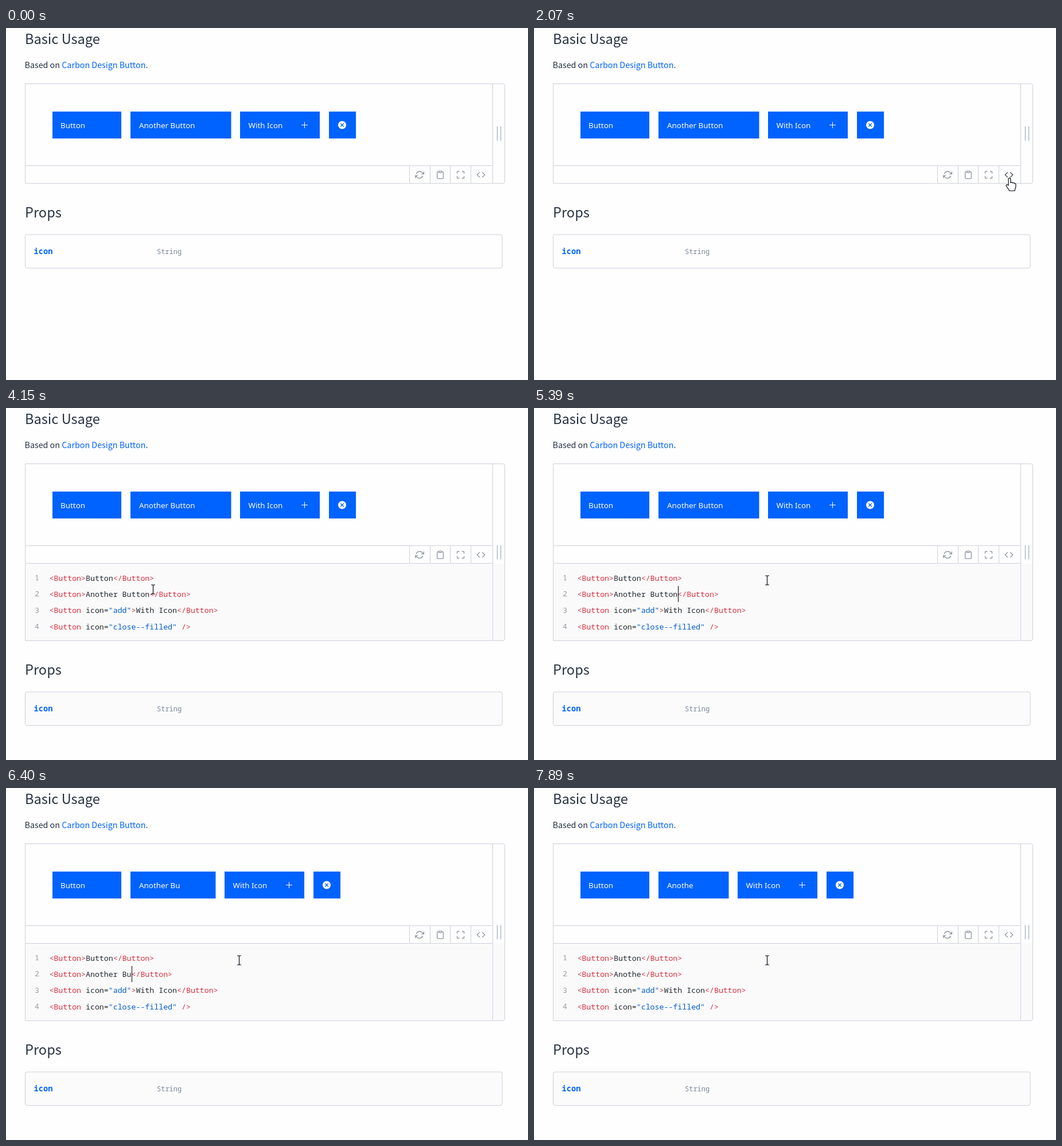
Animation of 910 by 615 pixels, one loop 8000 ms. Source, as an HTML page:

```html
<!DOCTYPE html>
<html lang="en">
<head>
<meta charset="utf-8">
<title>Button docs</title>
<style>
  html, body { margin: 0; width: 100%; height: 100%; overflow: hidden; background: #fefefe; }
  svg { display: block; }
  text { fill: #273142; font: 14.3px "Noto Sans CJK JP", "Noto Sans CJK SC", "Noto Sans", sans-serif; }
  .title { font-size: 23.6px; }
  .link { fill: #0062ff; }
  .label { fill: #fff; font: 13.4px "Noto Sans", sans-serif; }
  .button { fill: #0062ff; }
  .line { fill: none; stroke: #cfd1dd; }
  .icon { fill: none; stroke: #9096a1; stroke-width: 2; stroke-linecap: round; stroke-linejoin: round; }
  .icon.hover { stroke: #454b57; }
  .handle { stroke: #b3bccb; stroke-width: 1.6; }
  .mono { font: 13.25px "Noto Sans Mono", monospace; fill: #24292e; }
  .tag { fill: #d9303e; }
  .string { fill: #005cc5; }
  .number { fill: #989da6; }
  .cursor { fill: #fff; stroke: #0b0b18; stroke-width: 1.2; stroke-linejoin: round; }
</style>
</head>
<body>
<svg width="910" height="615" viewBox="0 0 910 615">
  <text class="title" x="33" y="27.5">Basic Usage</text>
  <text x="32.5" y="70">Based on <tspan class="link">Carbon Design Button</tspan>.</text>

  <g id="code">
    <path fill="#fafafb" d="M34 272H869V406H34z"/>
    <g class="mono">
      <text class="mono number" x="50" y="300.5">1</text>
      <text class="mono number" x="50" y="329">2</text>
      <text class="mono number" x="50" y="357.5">3</text>
      <text class="mono number" x="50" y="386">4</text>
      <text class="mono" x="75.4" y="301.5"><tspan class="tag">&lt;Button&gt;</tspan>Button<tspan class="tag">&lt;/Button&gt;</tspan></text>
      <text class="mono" x="75.4" y="330"><tspan class="tag">&lt;Button&gt;</tspan><tspan id="typed"></tspan><tspan class="tag">&lt;/Button&gt;</tspan></text>
      <text class="mono" x="75.4" y="358"><tspan class="tag">&lt;Button</tspan> icon=<tspan class="string">"add"</tspan><tspan class="tag">&gt;</tspan>With Icon<tspan class="tag">&lt;/Button&gt;</tspan></text>
      <text class="mono" x="75.4" y="387"><tspan class="tag">&lt;Button</tspan> icon=<tspan class="string">"close--filled"</tspan> <tspan class="tag">/&gt;</tspan></text>
    </g>
    <rect id="caret" y="311" width="1" height="28"/>
  </g>

  <path id="card" class="line"/>
  <path class="line" d="M34 240.5H849M34 271.5H849M703.5 241v30M739.5 241v30M774.5 241v30M810.5 241v30"/>
  <path id="handle" class="handle" d="M856.5 172v25M862.5 172v25"/>

  <path class="button" d="M81 146h120v47H81z"/>
  <text class="label" x="95" y="174.5">Button</text>
  <rect id="wide" class="button" x="217" y="146" height="47"/>
  <text id="label" class="label" x="232" y="174.5"></text>
  <g id="rest">
    <path class="button" d="M408 146h139v47H408zM563 146h47v47H563z"/>
    <text class="label" x="422.5" y="174.5">With Icon</text>
    <path d="M515 169.5h11M520.5 164v11" stroke="#fff"/>
    <circle cx="586" cy="169.5" r="7" fill="#fff"/>
    <path d="M583.3 166.8l5.4 5.4M588.7 166.8l-5.4 5.4" stroke="#0062ff" stroke-width="1.3"/>
  </g>

  <path class="icon" transform="translate(713 248.5) scale(.667)" d="M23 4v6h-6M1 20v-6h6M3.51 9a9 9 0 0 1 14.85-3.36L23 10M1 14l4.64 4.36A9 9 0 0 0 20.49 15"/>
  <path class="icon" transform="translate(749 248.5) scale(.667)" d="M16 4h2a2 2 0 0 1 2 2v14a2 2 0 0 1-2 2H6a2 2 0 0 1-2-2V6a2 2 0 0 1 2-2h2M9 2h6a1 1 0 0 1 1 1v2a1 1 0 0 1-1 1H9a1 1 0 0 1-1-1V3a1 1 0 0 1 1-1z"/>
  <path class="icon" transform="translate(784.5 248.5) scale(.667)" d="M8 3H5a2 2 0 0 0-2 2v3m18 0V5a2 2 0 0 0-2-2h-3m0 18h3a2 2 0 0 0 2-2v-3M3 16v3a2 2 0 0 0 2 2h3"/>
  <path id="toggle" class="icon" transform="translate(820 248.5) scale(.667)" d="M16 18l6-6-6-6M8 6l-6 6 6 6"/>

  <g id="props">
    <text id="anchor" class="title" x="9" y="330.5" style="fill:#abcaff">#</text>
    <text class="title" x="33" y="330.5">Props</text>
    <rect id="table" class="line" x="33.5" y="361" width="831.5" height="58.5" rx="3"/>
    <text class="mono link" x="48.5" y="395" style="font-size:13.7px;font-weight:700;fill:#0062ff">icon</text>
    <text class="mono" x="263" y="395" style="font-size:12px;fill:#7c8798">String</text>
  </g>

  <path id="cursor" class="cursor"/>
</svg>
<script>
const $ = id => document.getElementById(id);
const show = (id, on) => $(id).setAttribute('visibility', on ? 'inherit' : 'hidden');
const LOOP = 8000, OPEN = 2140, CLICK = 4320;
const FULL = 'Another Button';
const deletions = [5620, 6020, 6170, 6400, 6550, 6720, 6870, 7340];
const shrink = [0, 9, 17, 21, 27, 35, 47, 47, 53];

// Each stroke: start, end, number of steps, evenly timed waypoints
const strokes = [
  [610, 1220, 9, [[812, 562], [799, 455], [791, 374], [792, 268], [792, 264]]],
  [1370, 1840, 7, [[797, 263], [853, 259], [829, 262]]],
  [2600, 3370, 11, [[816, 268], [660, 312], [390, 346], [236, 345], [198, 334], [188, 323]]],
  [3450, 3830, 6, [[185, 316], [190, 302], [242, 326]]],
  [4000, 4150, 3, [[245, 325], [256, 317]]],
  [CLICK, CLICK, 1, [[261, 317]]],
  [4470, 4860, 6, [[280, 316], [385, 303], [406, 301]]]
];

const shapes = {
  arrow: 'M0 0V16l3.7-3.5 2.4 5.6 2.5-1-2.4-5.5H11.5z',
  hand: 'M-1.9 13V2a1.9 1.9 0 0 1 3.8 0v6.5c.8-1.3 3-1 3.4.4c1-1 2.9-.6 3.2.8c1.2-.6 2.4.2 2.4 1.6v4c0 2.5-1.6 3.6-1.8 7.2h-9.6c-.3-2.6-4-5.8-5.4-9c-.6-1.8 1.6-2.4 2.6-1.2z',
  beam: 'M-3.5-8h2.5l1 .7 1-.7h2.5M0-7.3V7.3M-3.5 8h2.5l1-.7 1 .7h2.5'
};

function pointerAt(t) {
  const stroke = strokes.filter(s => s[0] <= t).pop();
  if (!stroke) return null;
  const [start, end, steps, points] = stroke;
  if (steps === 1) return points[0];
  const step = Math.min(steps - 1, Math.floor((t - start) / (end - start) * (steps - 1) + 0.05));
  const u = step / (steps - 1) * (points.length - 1);
  const i = Math.min(points.length - 2, Math.floor(u));
  return points[i].map((v, axis) => Math.round(v + (points[i + 1][axis] - v) * (u - i)));
}

function drawPointer(t, open) {
  const pos = pointerAt(t);
  show('cursor', pos);
  if (!pos) return;
  const [x, y] = pos;
  const inToolbar = x > 703 && x < 849 && y > 240 && y < 272;
  const kind = inToolbar ? 'hand' : open && y > 272 ? 'beam' : 'arrow';
  $('cursor').setAttribute('d', shapes[kind]);
  $('cursor').setAttribute('transform', `translate(${x + (kind === 'beam' ? 0.5 : 0)} ${y})`);
  $('cursor').style.fill = kind === 'beam' ? 'none' : '';
  $('toggle').classList.toggle('hover', inToolbar && x > 810);
}

function draw(t) {
  const open = t >= OPEN, drop = open ? 135 : 0, bottom = 271.5 + drop;
  show('code', open);
  $('card').setAttribute('d', `M33.5 97.5H866q3.5 0 3.5 3.5V${bottom - 3.5}q0 3.5-3.5 3.5H33.5zM848.5 97.5V${bottom}`);
  $('handle').setAttribute('transform', `translate(0 ${drop / 2})`);
  $('props').setAttribute('transform', `translate(0 ${drop})`);
  $('table').style.fill = open ? '#fbfbfc' : 'none';
  show('anchor', t >= 990 && t < 1140);

  const removed = deletions.filter(time => time <= t).length;
  const text = FULL.slice(0, FULL.length - removed);
  $('typed').textContent = text;
  $('label').textContent = text.trim();
  $('wide').setAttribute('width', 175.5 - shrink[removed]);
  $('rest').setAttribute('transform', `translate(${-shrink[removed]} 0)`);

  // The caret blinks, restarting after each click or key
  const lastInput = removed ? deletions[removed - 1] : CLICK;
  show('caret', open && t >= CLICK && Math.floor((t - lastInput) / 535) % 2 === 0);
  $('caret').setAttribute('x', Math.round(75.9 + 7.95 * (8 + text.length)));
  drawPointer(t, open);
}

function tick() {
  draw(performance.now() % LOOP);
  requestAnimationFrame(tick);
}
tick();
</script>
</body>
</html>
```
